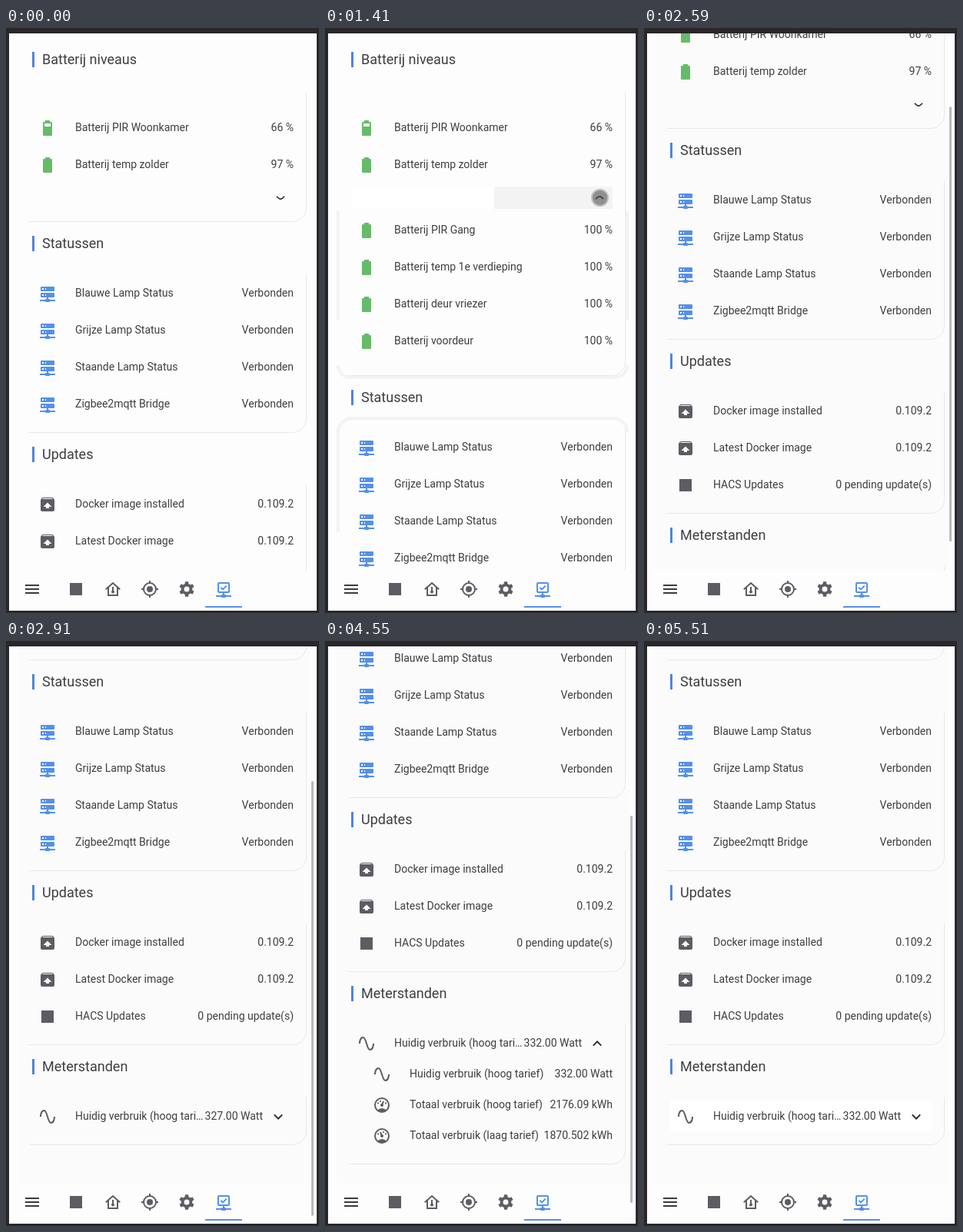
Write an HTML page with a canvas that moves like this. It is 407x760 px and loops after 6.06 s.

```html
<!DOCTYPE html>
<html lang="nl">
<head>
<meta charset="utf-8">
<title>Batterij niveaus</title>
<style>
html, body { margin: 0; width: 100%; height: 100%; overflow: hidden; background: #292728; }
canvas { display: block; width: 407px; height: 760px; }
</style>
</head>
<body>
<canvas id="stage"></canvas>
<script>
const W = 407, H = 760, LOOP = 6060, TICK = 78.7;
const PAPER = '#fdfdfd', INK = '#3d3e42', GREY = '#5b5d63', BLUE = '#5590e8', GREEN = '#66bb6a';
const canvas = document.getElementById('stage');
const ctx = canvas.getContext('2d');
const dpr = window.devicePixelRatio || 1;
canvas.width = W * dpr;
canvas.height = H * dpr;

const battery = 'M15 4V2H9V4H7.3A1.3 1.3 0 0 0 6 5.3V20.7A1.3 1.3 0 0 0 7.3 22H16.7A1.3 1.3 0 0 0 18 20.7V5.3A1.3 1.3 0 0 0 16.7 4Z';
const paths = {
  full: new Path2D(battery),
  part: new Path2D(battery + 'M16 10H8V6H16Z'),
  box: new Path2D('M20.5 5.2Q21 5.8 21 6.5V19A2 2 0 0 1 19 21H5A2 2 0 0 1 3 19V6.5Q3 5.8 3.5 5.2L4.8 3.6Q5.3 3 6 3H18Q18.7 3 19.2 3.6ZM5.1 5H18.9L17.9 4H5.9ZM12 9.5L6.5 15H10V17H14V15H17.5Z'),
  sine: new Path2D('M3 12C3 11 3.3 4 7.5 4C12 4 12 20 16.5 20C20.7 20 21 13 21 12')
};

const between = (t, a, b) => t >= a && t < b;
const easeOut = p => 1 - Math.pow(1 - Math.min(1, Math.max(0, p)), 2.4);

function rect(x, y, w, h, color) {
  ctx.fillStyle = color;
  ctx.fillRect(x, y, w, h);
}

function round(x, y, w, h, r) {
  ctx.beginPath();
  ctx.roundRect(x, y, w, h, r);
}

function disc(x, y, r) {
  ctx.beginPath();
  ctx.arc(x, y, r, 0, Math.PI * 2);
}

function line(...p) {
  ctx.beginPath();
  for (let i = 0; i < p.length; i += 2) ctx.lineTo(p[i], p[i + 1]);
  ctx.stroke();
}

function text(str, x, y, size = 14, align = 'left') {
  ctx.font = size + 'px Roboto, sans-serif';
  ctx.textAlign = align;
  ctx.fillStyle = INK;
  ctx.fillText(str, x, y);
}

// Network foot shared by two icons
function foot() {
  ctx.fillRect(11, 16, 2, 4);
  ctx.fillRect(2, 20, 20, 2);
  round(9, 19, 6, 4, 1);
  ctx.fill();
}

function gauge(flip) {
  if (flip) { ctx.translate(24, 0); ctx.scale(-1, 1); }
  disc(12, 12, 9);
  ctx.stroke();
  ctx.beginPath();
  ctx.moveTo(6, 18.6);
  ctx.quadraticCurveTo(12, 13.4, 18, 18.6);
  ctx.quadraticCurveTo(12, 23, 6, 18.6);
  ctx.fill();
  line(12, 12, 14, 7);
  disc(12, 12, 2);
  ctx.fill();
  for (const [x, y] of [[10, 7], [7, 9.5], [17, 9.5]]) { disc(x, y, 1.1); ctx.fill(); }
}

// Each icon is drawn in a 24 px box
const icons = {
  full() { ctx.fill(paths.full); },
  part() { ctx.fill(paths.part, 'evenodd'); },
  box() { ctx.fill(paths.box, 'evenodd'); },
  sine() { ctx.stroke(paths.sine); },
  plain() { ctx.fillRect(4, 4, 16, 16); },
  gauge() { gauge(false); },
  gaugeLow() { gauge(true); },
  server() {
    for (const y of [3, 11]) {
      ctx.beginPath();
      ctx.roundRect(3, y, 18, 6, 1);
      ctx.rect(5, y + 2, 2, 2);
      ctx.rect(9, y + 2, 1, 2);
      ctx.fill('evenodd');
    }
    foot();
  },
  menu() { for (const y of [6, 11, 16]) ctx.fillRect(3, y, 18, 2); },
  climate() {
    line(2.8, 12.2, 12, 4, 21.2, 12.2);
    line(6, 10, 6, 20, 18, 20, 18, 10);
    ctx.fillRect(11, 9, 2, 6);
    disc(12, 15.5, 2);
    ctx.fill();
  },
  target() {
    disc(12, 12, 8);
    ctx.stroke();
    disc(12, 12, 4);
    ctx.fill();
    line(12, 1, 12, 4);
    line(12, 20, 12, 23);
    line(1, 12, 4, 12);
    line(20, 12, 23, 12);
  },
  cog() {
    ctx.beginPath();
    for (let i = 0; i < 6; i++) {
      const a = i * Math.PI / 3 - Math.PI / 2;
      for (const [d, r] of [[-.32, 7.4], [-.21, 10], [.21, 10], [.32, 7.4]])
        ctx.lineTo(12 + r * Math.cos(a + d), 12 + r * Math.sin(a + d));
    }
    ctx.closePath();
    ctx.moveTo(15.5, 12);
    ctx.arc(12, 12, 3.5, 0, Math.PI * 2);
    ctx.fill('evenodd');
  },
  check() {
    round(5, 4, 14, 12, 1);
    ctx.stroke();
    line(8.3, 9.8, 11, 12.4, 15.7, 7.6);
    foot();
  }
};

function icon(name, x, y, color) {
  ctx.save();
  ctx.translate(x - 12, y - 12);
  ctx.fillStyle = ctx.strokeStyle = color;
  ctx.lineWidth = 2;
  icons[name]();
  ctx.restore();
}

function title(str, y) {
  rect(34, y - 10, 3, 20, '#4f83e3');
  text(str, 47, y + 6, 18);
}

function row(name, color, label, value, y, indent = 0) {
  icon(name, 54 + indent, y + 1, color);
  text(label, 90 + indent, y + 5);
  text(value, 374, y + 5, 14, 'right');
}

// Only the right and bottom edges of a card are visible
function card(top, bottom) {
  ctx.strokeStyle = '#e8e8e8';
  ctx.lineWidth = 1;
  ctx.beginPath();
  ctx.moveTo(390.5, top);
  ctx.lineTo(390.5, bottom - 18);
  ctx.arcTo(390.5, bottom + .5, 372, bottom + .5, 18);
  ctx.lineTo(30, bottom + .5);
  ctx.stroke();
}

function chevron(x, y, up, bold) {
  const d = up ? -1 : 1;
  ctx.strokeStyle = '#26282c';
  if (bold) {
    ctx.lineWidth = 2;
    line(x - 5.2, y - 2.6 * d, x, y + 2.6 * d, x + 5.2, y - 2.6 * d);
    return;
  }
  ctx.lineWidth = 1.6;
  ctx.beginPath();
  ctx.moveTo(x - 5, y - 1.8 * d);
  ctx.quadraticCurveTo(x - 2, y + 1.6 * d, x, y + 1.6 * d);
  ctx.quadraticCurveTo(x + 2, y + 1.6 * d, x + 5, y - 1.8 * d);
  ctx.stroke();
}

function halo() {
  ctx.strokeStyle = '#f3f3f3';
  ctx.lineWidth = 4;
  ctx.beginPath();
  ctx.moveTo(17, 238);
  ctx.lineTo(17, 380);
  ctx.moveTo(393, 238);
  ctx.lineTo(393, 380);
  ctx.moveTo(17, 438);
  ctx.arcTo(17, 454, 34, 454, 16);
  ctx.arcTo(393, 454, 393, 438, 16);
  ctx.moveTo(17, 655);
  ctx.arcTo(17, 507, 34, 507, 18);
  ctx.arcTo(393, 507, 393, 655, 18);
  ctx.stroke();
}

function pressRow(y, h, age) {
  rect(34, y, 340, h, '#fff');
  if (age < 0 || age > 300) return;
  ctx.save();
  ctx.beginPath();
  ctx.rect(34, y, 340, h);
  ctx.clip();
  ctx.fillStyle = `rgba(0,0,0,${.06 * (1 - age / 300)})`;
  disc(356, y + h / 2, 30 + age * 1.5);
  ctx.fill();
  ctx.restore();
}

const touches = [
  [460, 1180, 357.5, 220.5],
  [1340, 1820, 357.5, 220.5],
  [3220, 3930, 348.5, 624.5],
  [5030, 5510, 353.5, 519.5]
];

function touch(x, y) {
  disc(x, y, 10);
  ctx.fillStyle = 'rgba(80,80,80,.62)';
  ctx.fill();
  disc(x, y, 10.5);
  ctx.strokeStyle = 'rgba(185,185,185,.9)';
  ctx.lineWidth = 2;
  ctx.stroke();
}

function scrollAt(t) {
  const s = TICK * Math.floor((t + 16) / TICK);
  if (t < 2540) return 0;
  if (t < 3380) return Math.round(227 * easeOut((s - 2480) / 430));
  if (t < 4250) return 222;
  if (t < 5110) return Math.round(222 + 106 * easeOut((s - 4210) / 512));
  return 227;
}

function page(t, batOpen, meterOpen) {
  title('Batterij niveaus', 41);
  if (between(t, 460, 2540)) pressRow(206, 29, t - (t < 1340 ? 460 : 1340));
  row('part', GREEN, 'Batterij PIR Woonkamer', '66 %', 129);
  row('full', GREEN, 'Batterij temp zolder', '97 %', 177);
  chevron(357, 220.5, batOpen, false);
  if (batOpen) {
    ['PIR Gang', 'temp 1e verdieping', 'deur vriezer', 'voordeur'].forEach((name, i) =>
      row('full', GREEN, 'Batterij ' + name, '100 %', 262 + 48 * i));
  }
  const shift = batOpen ? 200 : 0;
  card(82, 251 + shift);

  ctx.save();
  ctx.translate(0, shift);
  title('Statussen', 280);
  ['Blauwe Lamp Status', 'Grijze Lamp Status', 'Staande Lamp Status', 'Zigbee2mqtt Bridge'].forEach((name, i) =>
    row('server', BLUE, name, 'Verbonden', 344 + 48 * i));
  card(320, 525);

  title('Updates', 554);
  row('box', GREY, 'Docker image installed', '0.109.2', 618);
  row('box', GREY, 'Latest Docker image', '0.109.2', 666);
  row('plain', GREY, 'HACS Updates', '0 pending update(s)', 714);
  card(594, 751);

  title('Meterstanden', 780);
  if (between(t, 3220, 4250) || t >= 5030) pressRow(824, 40, t - (t < 4250 ? 3220 : 5030));
  const watt = t < 3380 ? '327.00 Watt' : '332.00 Watt';
  icon('sine', 54, 845, GREY);
  text('Huidig verbruik (hoog tari…', 90, 849);
  text(watt, 334, 849, 14, 'right');
  chevron(354, 845, meterOpen, true);
  if (meterOpen) {
    row('sine', GREY, 'Huidig verbruik (hoog tarief)', watt, 884, 20);
    row('gauge', GREY, 'Totaal verbruik (hoog tarief)', '2176.09 kWh', 924, 20);
    row('gaugeLow', GREY, 'Totaal verbruik (laag tarief)', '1870.502 kWh', 964, 20);
  }
  card(820, meterOpen ? 1001 : 881);
  ctx.restore();
}

function nav() {
  rect(4, 705, 400, 52, PAPER);
  icon('menu', 34, 729, '#3a3b3e');
  ['plain', 'climate', 'target', 'cog'].forEach((name, i) => icon(name, 91 + 48 * i, 729, GREY));
  icon('check', 283, 729, BLUE);
  rect(259, 751, 48, 2, BLUE);
}

function scrollbar(scroll, height) {
  const track = 735;
  rect(397, 11.5 + scroll / height * track, 3, 750 / height * track, '#b9b9b9');
}

function draw(t) {
  ctx.setTransform(dpr, 0, 0, dpr, 0, 0);
  rect(0, 0, W, H, '#292728');
  rect(4, 7, 400, 750, PAPER);

  const batOpen = between(t, 600, 1500);
  const meterOpen = between(t, 3380, 5110);
  const scroll = scrollAt(t);

  ctx.save();
  ctx.beginPath();
  ctx.rect(4, 7, 400, 698);
  ctx.clip();
  if (t >= 2540) rect(15, 7, 380, 698, '#fbfbfb');
  if (batOpen) halo();
  ctx.translate(0, -scroll);
  page(t, batOpen, meterOpen);
  ctx.restore();

  nav();
  if (between(t, 2540, 3300) || between(t, 4250, 5110)) scrollbar(scroll, meterOpen ? 1097 : 977);
  for (const [from, to, x, y] of touches) if (between(t, from, to)) touch(x, y);
}

function tick() {
  draw(performance.now() % LOOP);
  requestAnimationFrame(tick);
}
tick();
</script>
</body>
</html>
```
